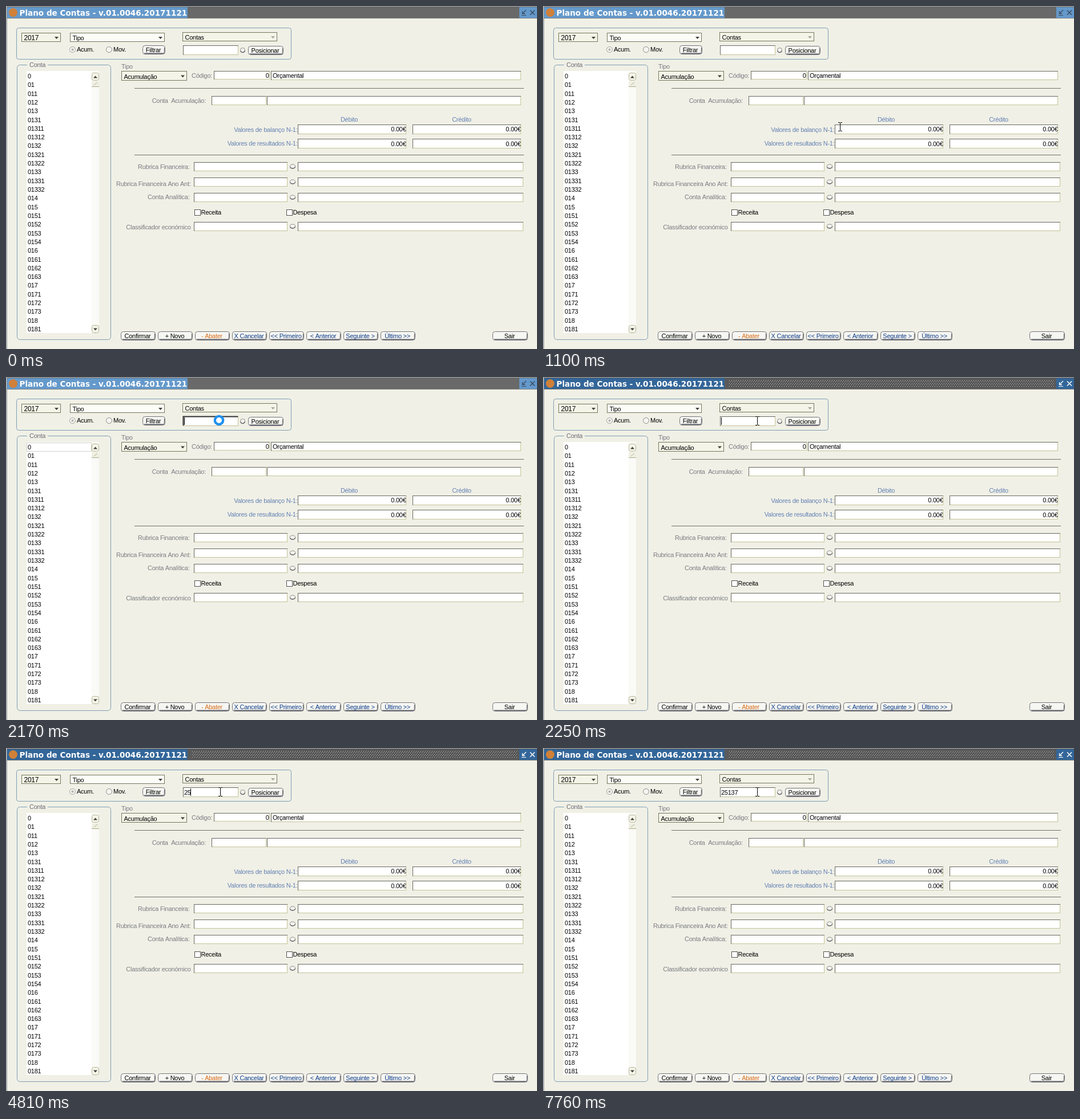
Recreate the animation shown at these times as an HTML page with a canvas. Size 930 px wide and 602 px high, loop 8000 ms.

```html
<!DOCTYPE html>
<html lang="pt">
<head>
<meta charset="utf-8">
<title>Plano de Contas</title>
<style>
html, body { margin: 0; width: 100%; height: 100%; overflow: hidden; background: #f0f0e6; }
canvas { display: block; }
</style>
</head>
<body>
<canvas id="stage" width="930" height="602"></canvas>
<script>
const g = document.getElementById('stage').getContext('2d');
const LOOP = 8000;
const BG = '#f0f0e6', GREY = '#7c7c84', BLUE = '#6480b4', NAVY = '#0c3c88', FRAME = '#7f9db4';
const SANS = '"Liberation Sans", Arial, sans-serif';

function rect(x, y, w, h, color) {
  g.fillStyle = color;
  g.fillRect(x, y, w, h);
}

function line(points, color, width = 1) {
  g.beginPath();
  for (const [x, y] of points) g.lineTo(x, y);
  g.strokeStyle = color;
  g.lineWidth = width;
  g.stroke();
}

function shape(points, fill) {
  g.beginPath();
  for (const [x, y] of points) g.lineTo(x, y);
  g.closePath();
  g.fillStyle = fill;
  g.fill();
}

function disc(x, y, r, fill) {
  g.beginPath();
  g.arc(x, y, r, 0, 7);
  g.fillStyle = fill;
  g.fill();
}

function text(s, x, y, color = '#000', align = 'left', size = 11) {
  g.font = size + 'px ' + SANS;
  g.letterSpacing = '-0.26px';
  g.textAlign = align;
  g.fillStyle = color;
  g.fillText(s, x, y);
}

function field(x, y, right, bottom) {
  const w = right - x, h = bottom - y;
  rect(x, y, w, h, '#fff');
  rect(x, bottom - 1, w, 1, '#c4c498');
  rect(right - 1, y, 1, h, '#c4c498');
  rect(x, y, w, 1, '#686860');
  rect(x, y, 1, h, '#686860');
}

function triangle(x, y, dir, color) {
  shape([[x - 3.5, y - 2 * dir], [x + 3.5, y - 2 * dir], [x, y + 2 * dir]], color);
}

function combo(x, y, right, bottom, label, { size = 11, fill = '#f4f4e8', arrow = '#404038' } = {}) {
  rect(x, y, right - x, bottom - y, '#75755c');
  rect(x + 1, y + 1, right - x - 2, bottom - y - 2, fill);
  text(label, x + 4.5, Math.round((y + bottom) / 2) + 5, '#000', 'left', size);
  triangle(right - 7.5, (y + bottom) / 2 + 1, 1, arrow);
}

function roundBox(x, y, w, h, r, fill, stroke) {
  g.beginPath();
  g.roundRect(x, y, w, h, r);
  if (fill) { g.fillStyle = fill; g.fill(); }
  g.lineWidth = 1;
  g.strokeStyle = stroke;
  g.stroke();
}

function button(x, y, right, label, color = '#000') {
  const w = right - x;
  roundBox(x + .5, y + .5, w - 1, 15, 4, '#f6f6f2', '#74747c');
  line([[x + 3, y + 13.5], [right - 2, y + 13.5]], '#a4a4a8');
  line([[x + 3, y + 14.5], [right - 2, y + 14.5], [right - 1.5, y + 4]], '#68686e');
  text(label, x + w / 2 - 1, y + 12, color, 'center');
}

function oval(x, y, rx, ry, stroke = '#8c8c88') {
  g.beginPath();
  g.ellipse(x, y, rx, ry, 0, 0, 7);
  g.fillStyle = '#f4f4f0';
  g.fill();
  g.strokeStyle = stroke;
  g.lineWidth = 1;
  g.stroke();
}

// Small lookup button with a darker lower rim.
function lookup(x, y, rx, ry) {
  oval(x, y, rx, ry);
  g.beginPath();
  g.ellipse(x, y, rx, ry, 0, .2, 2.9);
  g.strokeStyle = '#606064';
  g.lineWidth = 1.3;
  g.stroke();
}

function titleBar(active) {
  const blue = active ? '#336699' : '#6499cb';
  const icon = active ? '#fff' : '#3c4c60';
  rect(0, 0, 930, 1, '#a8acb0');
  rect(0, 1, 1, 601, '#c4c4c0');
  rect(1, 1, 1, 601, '#88909a');
  rect(2, 1, 928, 20, active ? '#5a5a5a' : '#696969');
  rect(2, 21, 928, 1, '#888884');
  rect(2, 2, 316, 19, blue);
  rect(899, 2, 31, 19, blue);
  if (active) {
    for (let row = 0; row < 5; row++)
      for (let x = 326 + row % 2 * 2; x < 896; x += 4) {
        rect(x, 6 + row * 2.5 | 0, 1, 1, '#d4d4d4');
        rect(x + 1, 7 + row * 2.5 | 0, 1, 1, '#303030');
      }
  }
  disc(12.5, 11.5, 7.5, '#d08038');
  g.font = 'bold 13.55px "DejaVu Sans", Verdana, sans-serif';
  g.letterSpacing = '0px';
  g.textAlign = 'left';
  g.fillStyle = '#fff';
  g.fillText('Plano de Contas - v.01.0046.20171121', 23.5, 17);
  line([[911, 7], [905, 13]], icon, 1.5);
  line([[904.5, 9], [904.5, 13.5], [909, 13.5]], icon, 1.3);
  line([[903, 16.5], [911, 16.5]], icon);
  line([[918, 7.5], [926, 15.5]], icon, 1.6);
  line([[926, 7.5], [918, 15.5]], icon, 1.6);
}

function filters(pressed) {
  roundBox(18.5, 38.5, 481, 55, 4, null, FRAME);
  combo(27, 47, 96, 63, '2017', { size: 12 });
  combo(112, 47, 278, 63, 'Tipo', { fill: '#fdfdf8' });
  combo(309, 46, 475, 62, 'Contas', { arrow: '#a8a89c' });
  oval(116.5, 76.5, 5, 5, '#a0a09c');
  disc(116.5, 76.5, 2, '#b0b0ac');
  oval(180.5, 76.5, 5, 5);
  text('Acum.', 124, 80);
  text('Mov.', 188, 80);
  button(239, 69, 279, 'Filtrar');
  field(310, 69, 407, 86);
  if (pressed) line([[310.5, 85], [310.5, 69.5], [406, 69.5]], '#303030', 2);
  lookup(414.5, 77.5, 4, 4);
  button(424, 70, 486, 'Posicionar');
}

const CODES = ('0 01 011 012 013 0131 01311 01312 0132 01321 01322 0133 01331 01332 014 015 ' +
  '0151 0152 0153 0154 016 0161 0162 0163 017 0171 0172 0173 018 0181').split(' ');

function list() {
  roundBox(19.5, 103.5, 164, 482, 5, null, FRAME);
  rect(37, 102, 36, 3, BG);
  text('Conta', 41, 107, '#6c6c78');
  rect(36, 114, 114, 460, '#fff');
  rect(150, 114, 13, 460, '#fafaf6');
  for (const [y, dir] of [[117, -1], [560, 1]]) {
    roundBox(150.5, y + .5, 12, 13, 3, '#f4f4e8', '#b4b498');
    triangle(156.5, y + 7.5, dir, '#404038');
  }
  rect(150, 132, 13, 10, '#f0f0e2');
  rect(150, 141, 13, 1, '#a8a88c');
  line([[154, 139], [160, 134]], '#b0b098');
  CODES.forEach((code, i) => text(code, 38, Math.round(127 + i * 15.31)));
}

function form() {
  text('Tipo', 202, 110, GREY);
  combo(202, 114, 317, 131, 'Acumulação');
  text('Código:', 325, 126, GREY);
  field(364, 114, 462, 129);
  text('0', 460.5, 126, '#000', 'right');
  field(464, 114, 902, 130);
  text('Orçamental', 467, 126);
  rect(225, 144, 682, 1, '#707070');

  text('Conta  Acumulação:', 350, 170, GREY, 'right');
  field(360, 158, 456, 174);
  field(457, 158, 902, 174);

  text('Débito', 601, 203, BLUE, 'center');
  text('Crédito', 798, 203, BLUE, 'center');
  text('Valores de balanço N-1:', 510.5, 221, BLUE, 'right');
  text('Valores de resultados N-1:', 510.5, 245, BLUE, 'right');
  for (const y of [208, 233])
    for (const [x, right] of [[511, 701], [712, 902]]) {
      field(x, y, right, y + 17);
      text('0.00€', right - .5, y === 208 ? 220 : 246, '#000', 'right');
    }
  rect(225, 261, 682, 1, '#707070');

  const rows = [['Rubrica Financeira:', 274, 286, 321.5], ['Rubrica Financeira Ano Ant:', 301, 316, 323.5],
    ['Conta Analítica:', 328, 339, 321.5], ['Classificador económico', 379, 392, 323.5]];
  for (const [label, y, base, right] of rows) {
    text(label, right, base, GREY, 'right');
    field(329, y, 493, y + 16);
    lookup(502, y + 7.5, 4.7, 3.5);
    field(511, y, 906, y + 16);
  }
  for (const [x, label] of [[330, 'Receita'], [491, 'Despesa']]) {
    rect(x, 357, 11, 11, '#505050');
    rect(x + 1, 358, 9, 9, '#fff');
    text(label, x + 11.5, 366);
  }
}

function buttons() {
  const labels = ['Confirmar', '+ Novo', '- Abater', 'X Cancelar', '<< Primeiro',
    '< Anterior', 'Seguinte >', 'Último >>'];
  labels.forEach((label, i) => {
    const x = 201 + i * 65;
    button(x, 571, x + 61, label, i < 2 ? '#000' : i === 2 ? '#d86c18' : NAVY);
  });
  button(852, 571, 914, 'Sair');
}

function arrow(x, y) {
  const tip = [[0, 0], [0, 16], [3.7, 12.5], [6.2, 18], [8.5, 17], [6.1, 11.6], [11, 11.6]]
    .map(([dx, dy]) => [x + dx + .5, y + dy + .5]);
  shape(tip, '#fff');
  line([...tip, tip[0]], '#000');
}

function beam(x, y) {
  rect(x, y - 7, 1, 14, '#000');
  for (const end of [y - 8, y + 7]) {
    rect(x - 3, end, 3, 1, '#000');
    rect(x + 1, end, 3, 1, '#000');
  }
}

function ring(x, y) {
  disc(x, y, 9.3, '#1e90f0');
  disc(x, y, 5, '#fff');
}

// The pointer jumps to each place at the given time.
const POINTER = [
  [70, arrow, 847, 588], [130, arrow, 832, 548], [180, arrow, 816, 525], [230, arrow, 824, 570],
  [460, arrow, 820, 569], [530, arrow, 811, 566], [610, arrow, 801, 561], [700, arrow, 782, 540],
  [780, arrow, 742, 489], [860, arrow, 686, 418], [940, arrow, 626, 346], [1020, arrow, 568, 270],
  [1100, beam, 520, 212], [1160, arrow, 450, 149], [1240, arrow, 402, 106],
  [1330, beam, 340, 76], [1390, beam, 377, 75], [1790, beam, 377, 74], [1870, beam, 376, 75],
  [1940, beam, 376, 76], [2010, beam, 375, 77], [2170, ring, 373, 76], [2250, beam, 375, 77]
];
const KEYS = [4430, 4810, 5510, 6910, 7140];
const BLINKS = [[2170, 2780], [3420, 4020], [4430, 5420], [5510, 6130], [6750, 7760]];

function draw(now) {
  const t = now % LOOP;
  const pressed = t >= 2170 && t < 2250;
  rect(0, 0, 930, 602, BG);
  titleBar(t >= 2250);
  filters(pressed);
  list();
  if (pressed) {
    g.lineWidth = 1;
    g.strokeStyle = '#d0d0cc';
    g.strokeRect(36.5, 115.5, 113, 15);
  }
  form();
  buttons();

  const typed = KEYS.filter(k => t >= k).length;
  text('25137'.slice(0, typed), 312, 82);
  if (BLINKS.some(([on, off]) => t >= on && t < off))
    rect(312 + Math.floor(typed * 5.86 + .2), 71, 1, 13, '#000');

  const spot = POINTER.findLast(p => t >= p[0]);
  if (spot) spot[1](spot[2], spot[3]);
}

const start = performance.now();
(function tick() {
  draw(performance.now() - start);
  requestAnimationFrame(tick);
})();
</script>
</body>
</html>
```
